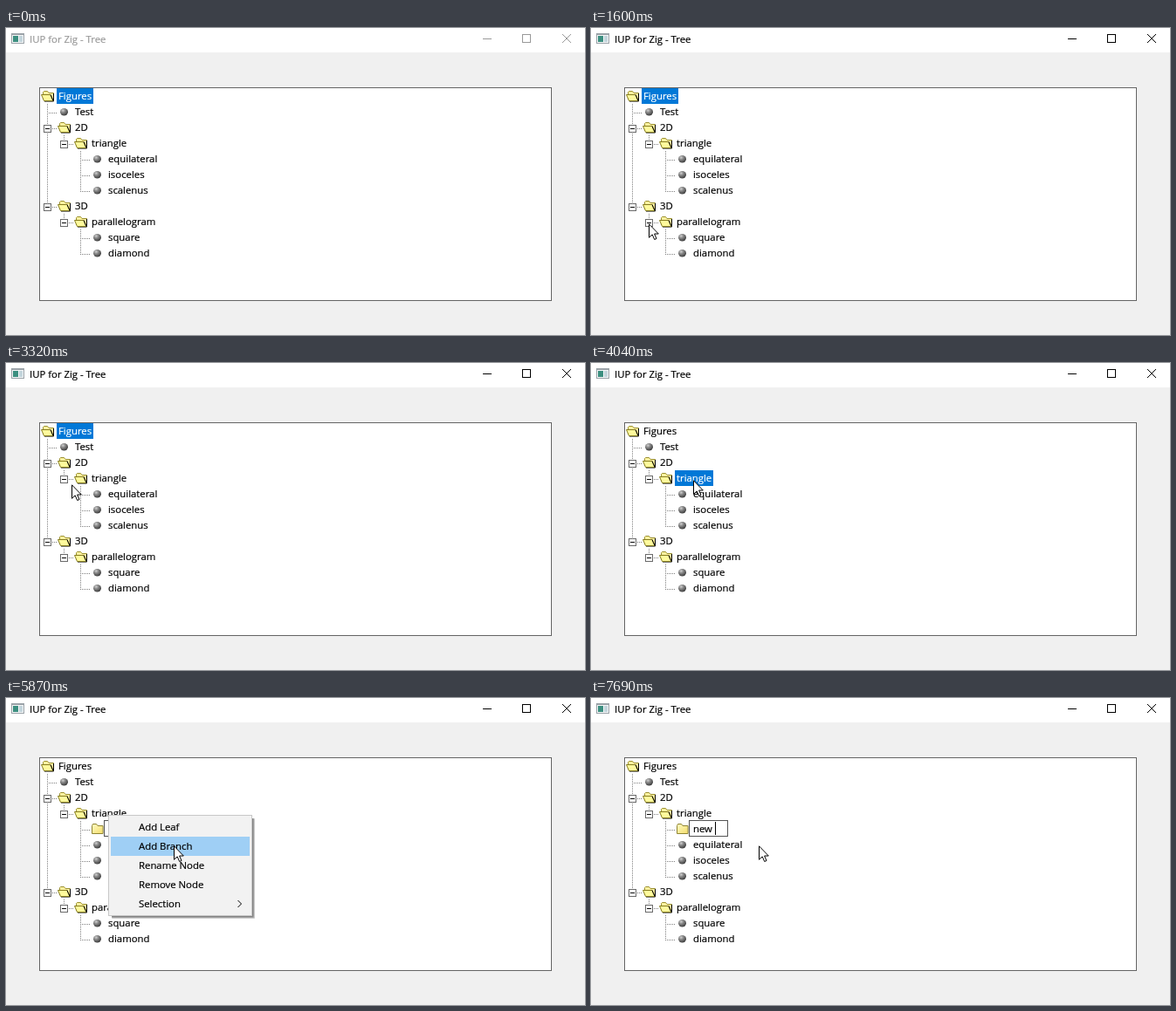
Animation of 663 by 352 pixels, one loop 8 s. Source, as an HTML page:

```html
<!DOCTYPE html>
<html lang="en">
<head>
<meta charset="utf-8">
<title>IUP for Zig - Tree</title>
<style>
html, body { margin: 0; width: 100%; height: 100%; overflow: hidden; background: #f0f0f0; }
svg { display: block; }
text { font: 11.35px "Open Sans", "Noto Sans", sans-serif; white-space: pre; fill: currentColor; stroke: currentColor; stroke-width: .2; }
.px { shape-rendering: crispEdges; }
.dots { stroke: #808080; stroke-dasharray: 1 1; shape-rendering: crispEdges; }
</style>
</head>
<body>
<svg width="663" height="352" viewBox="0 0 663 352">
  <defs>
    <radialGradient id="ball" cx=".36" cy=".3" r=".7">
      <stop offset="0" stop-color="#d0d0d0"/>
      <stop offset=".4" stop-color="#8a8a8a"/>
      <stop offset="1" stop-color="#404040"/>
    </radialGradient>
    <linearGradient id="paper" x1="0" y1="0" x2="1" y2="1">
      <stop offset="0" stop-color="#fffbc4"/>
      <stop offset="1" stop-color="#f3dd6c"/>
    </linearGradient>
    <g id="leaf"><ellipse cx="7.5" cy="8.2" rx="4.5" ry="4.2" fill="url(#ball)"/></g>
    <g id="open">
      <path d="M2.5 12V3.5l1-1h4l1.5 2h5.5v9" fill="#fff2a0" stroke="#9a9030"/>
      <path d="M14.5 5v9H4" fill="none" stroke="#000"/>
      <path d="M.5 6.5h10.5l3 7H3.5z" fill="#fffa9c" stroke="#857c20"/>
      <path d="M11 6.5l3 7" stroke="#000"/>
    </g>
    <g id="closed">
      <path d="M1.5 13.5v-9l1-2h4l1.5 2h6v9z" fill="url(#paper)" stroke="#8f8433"/>
    </g>
  </defs>
  <rect width="663" height="28" fill="#fff"/>
  <g class="px">
    <rect x="6" y="6" width="15" height="12" fill="#9aa2a8"/>
    <rect x="7" y="8" width="13" height="9" fill="#f4f6f7"/>
    <rect x="8" y="9" width="6" height="7" fill="#3c8f80"/>
    <rect x="15" y="9" width="4" height="7" fill="#c3d5dc"/>
  </g>
  <g id="bar">
    <text x="27" y="17">IUP for Zig - Tree</text>
    <g fill="none" stroke="currentColor">
      <path class="px" d="M546 12.5h10M591.5 7.5h9v9h-9z"/>
      <path d="M637 7l10 10M647 7l-10 10"/>
    </g>
  </g>
  <rect class="px" x="38.5" y="68.5" width="586" height="244" fill="#fff" stroke="#646464"/>
  <g id="tree"></g>
  <g id="menu"></g>
  <path id="mouse" d="M.5 .8V16.3L4.2 12.9 6.7 18.5 9 17.5 6.6 12H11.3z" fill="#fff" stroke="#000"/>
</svg>
<script>
const LOOP = 8000, ROW = 18, INDENT = 19, ITEM = 22;
const COLLAPSE = 1130, EXPAND = 1600, FOLD = 2560, UNFOLD = 3020;
const SELECT = 3830, MENU = 4510, ADD = 5870, BLINK = 540;

const el = id => document.getElementById(id);
const within = (t, a, b) => t >= a && t < b;
const clamp = v => Math.max(0, Math.min(1, v));
const easeOut = u => u * (2 - u);
const easeBoth = u => u * u * (3 - 2 * u);

const pen = document.createElement("canvas").getContext("2d");
pen.font = '11.35px "Open Sans", "Noto Sans", sans-serif';
const width = s => Math.round(pen.measureText(s).width);

// one line per node, indented by its level; "+" marks the node being added
const NODES = `Figures
 Test
 2D
  triangle
   +
   equilateral
   isoceles
   scalenus
 3D
  parallelogram
   square
   diamond`.split("\n").map(s => ({ name: s.trim(), lv: s.search(/\S/) }));
NODES.forEach((n, i) => n.branch = i + 1 < NODES.length && NODES[i + 1].lv > n.lv);

const ITEMS = ["Add Leaf", "Add Branch", "Rename Node", "Remove Node", "Selection"];

// each glide bends toward a control point and continues from the one before
const GLIDES = [
  { from: 60, until: 850, steps: 12, bend: [-165, 28], to: [66, 220], ease: easeOut },
  { from: 930, until: 930, steps: 1, to: [66, 224] },
  { from: 1740, until: 2420, steps: 10, bend: [86, 180], to: [65, 136], ease: easeBoth },
  { from: 3240, until: 3690, steps: 7, bend: [90, 146], to: [117, 136], ease: easeBoth },
  { from: 3830, until: 4040, steps: 2, to: [117, 134] },
  { from: 4960, until: 5460, steps: 8, bend: [147, 131], to: [192, 169], ease: easeOut }
];

function pointer(t) {
  if (t < GLIDES[0].from || within(t, 7000, 7150)) return null;
  let pos = [838, 447];
  for (const { from, until, steps, bend, to, ease = easeOut } of GLIDES) {
    if (t < from) break;
    const part = until > from ? clamp((t - from) / (until - from)) : 1;
    const u = ease((Math.floor(part * (steps - 1) + 1e-6) + 1) / steps);
    pos = pos.map((p, i) => {
      const c = bend ? bend[i] : (p + to[i]) / 2;
      return Math.round(p * (1 - u) ** 2 + 2 * c * u * (1 - u) + to[i] * u * u);
    });
  }
  return pos;
}

const label = (x, y, s, color = "#000") => `<text x="${x}" y="${y}" color="${color}">${s}</text>`;
const box = (x, y, w, h, attrs = "") => `<rect class="px" x="${x}" y="${y}" width="${w}" height="${h}" ${attrs}/>`;

function editor(t, y) {
  const typed = "new ".slice(0, t < 7000 ? 0 : t < 7150 ? 1 : t < 7690 ? 3 : 4);
  const end = 117 + width(typed);
  const caret = typed || Math.floor((t - ADD + 30) / BLINK) % 2 === 0;
  return box(112.5, y - .5, Math.max(26, end - 98), ROW, 'fill="#fff" stroke="#555"') +
    label(117, y + 13, typed) + (caret ? box(end, y + 1, 1, 15) : "");
}

function tree(t) {
  const picked = t < SELECT ? "Figures" : t < ADD ? "triangle" : "";
  const shut = { parallelogram: within(t, COLLAPSE, EXPAND), triangle: within(t, FOLD, UNFOLD) };
  const rows = [];
  let limit = Infinity;
  for (const node of NODES) {
    if (node.lv > limit || node.name === "+" && t < ADD) continue;
    limit = shut[node.name] ? node.lv : Infinity;
    rows.push({ ...node, y: 69 + ROW * rows.length });
  }
  let lines = "", body = "";
  rows.forEach(({ lv, name, branch, y }, i) => {
    const x = 40 + INDENT * lv, cx = x - 12, cy = y + 10, isNew = name === "+";
    if (lv) lines += `<path class="dots" d="M${cx} ${cy + .5}H${x - 1}"/>`;
    let last = 0;
    for (let j = i + 1; j < rows.length && rows[j].lv > lv; j++)
      if (rows[j].lv === lv + 1) last = rows[j].y;
    if (last) lines += `<path class="dots" d="M${x + 7.5} ${y + ROW}V${last + 10}"/>`;
    if (lv && branch) {
      body += box(cx - 3.5, cy - 3.5, 8, 8, 'fill="#fff" stroke="#6a6a6a"') + box(cx - 2, cy, 5, 1);
      if (shut[name]) body += box(cx, cy - 2, 1, 5);
    }
    const icon = isNew || shut[name] ? "closed" : branch ? "open" : "leaf";
    body += `<use href="#${icon}" x="${x}" y="${y + 1}"/>`;
    if (isNew) {
      body += editor(t, y);
    } else {
      const sel = name === picked;
      if (sel) body += box(x + 18, y, width(name) + 4, ROW, 'fill="#0078d7"');
      body += label(x + 20, y + 13, name, sel ? "#fff" : "#000");
    }
  });
  return lines + body;
}

function menu(t, pos) {
  const fadeIn = t < MENU ? 0 : t < MENU + 60 ? .5 : 1;
  const alpha = fadeIn * (1 - clamp(Math.floor((t - ADD) / 70) / 4));
  if (!alpha) return "";
  const hot = Math.floor((pos[1] - 137) / ITEM);
  let s = "";
  for (let i = 1; i <= 4; i++)
    s += `<rect x="121" y="138" width="${160 + i}" height="${111 + i}" rx="1" opacity=".2"/>`;
  s += box(117.5, 134.5, 164, 115, 'fill="#f2f2f2" stroke="#c8c8c8"');
  if (hot >= 0) s += box(120, 137 + ITEM * hot, 159, ITEM, 'fill="#9fcff5"');
  ITEMS.forEach((item, i) => s += label(152, 152 + ITEM * i, item));
  s += '<path d="M265.5 232l4 4-4 4" fill="none" stroke="#000"/>';
  return `<g opacity="${alpha}">${s}</g>`;
}

const shown = {};
function put(id, html) {
  if (shown[id] !== html) el(id).innerHTML = shown[id] = html;
}

function draw(t) {
  const pos = pointer(t);
  el("bar").style.color = t < 1070 ? "#999" : "#000";
  put("tree", tree(t));
  put("menu", menu(t, pos));
  el("mouse").style.display = pos ? "" : "none";
  if (pos) el("mouse").setAttribute("transform", `translate(${pos})`);
}

const start = performance.now();
function tick() {
  draw((performance.now() - start) % LOOP);
  requestAnimationFrame(tick);
}
draw(0);
requestAnimationFrame(tick);
</script>
</body>
</html>
```
